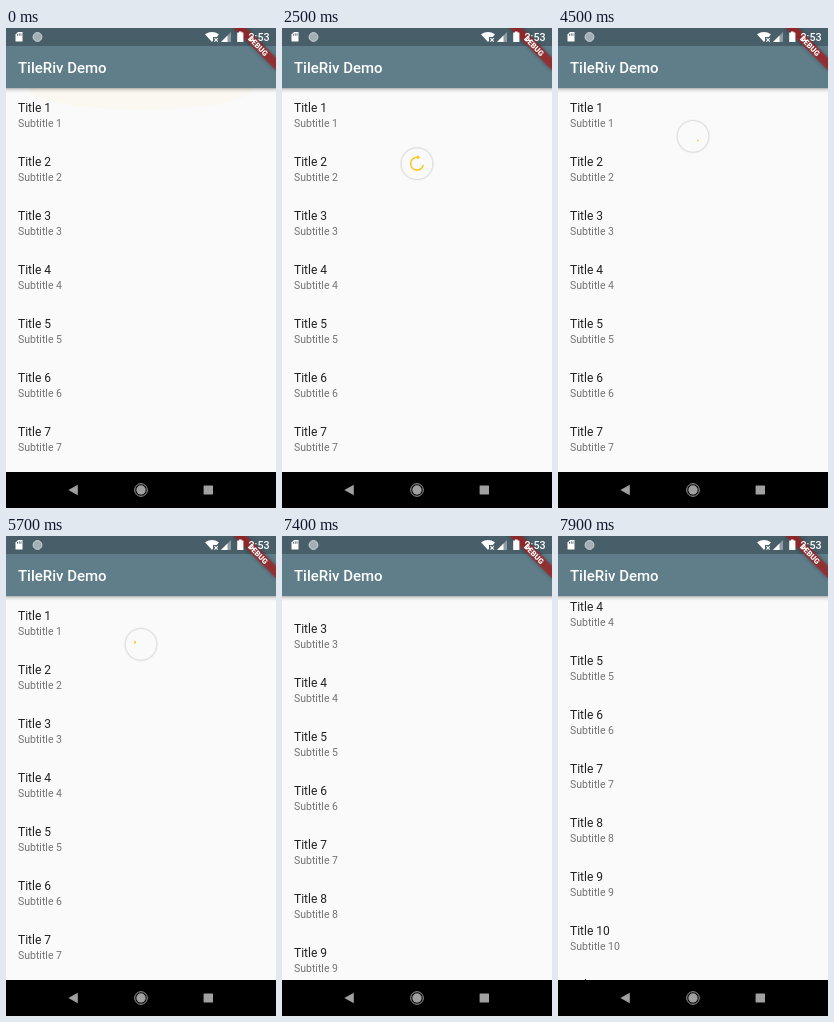
Animation, 270 px wide and 480 px high, one loop 8000 ms. Source, as an HTML page:

```html
<!DOCTYPE html>
<html lang="en">
<head>
<meta charset="utf-8">
<title>Pull to refresh list</title>
<style>
  html, body { margin: 0; width: 100%; height: 100%; overflow: hidden; background: #fafafa; }
  svg { display: block; width: 100vw; height: 100vh; font-family: Roboto, sans-serif; }
  .title { font-size: 12px; fill: rgba(0, 0, 0, .87); }
  .sub { font-size: 10.5px; fill: rgba(0, 0, 0, .54); }
  #disc { filter: drop-shadow(0 .8px 1px rgba(0, 0, 0, .32)); }
  #ribbon { filter: drop-shadow(0 0 2px rgba(0, 0, 0, .5)); }
</style>
</head>
<body>
<svg viewBox="0 0 270 480">
  <defs>
    <clipPath id="body"><rect y="60" width="270" height="384"/></clipPath>
    <linearGradient id="shade" x2="0" y2="1">
      <stop stop-color="#000" stop-opacity=".3"/>
      <stop offset=".4" stop-color="#000" stop-opacity=".1"/>
      <stop offset="1" stop-color="#000" stop-opacity="0"/>
    </linearGradient>
  </defs>
  <rect width="270" height="480" fill="#fafafa"/>

  <g clip-path="url(#body)">
    <g id="list"></g>
    <ellipse id="glow" cx="135" cy="60" rx="112" ry="22" fill="#ffd740"/>
    <g id="spinner">
      <circle id="disc" r="15.4" fill="#fafafa"/>
      <g id="ink">
        <path id="arc" fill="none" stroke="#fbc51d" stroke-width="1.5" stroke-linecap="square"/>
        <path id="arrow" fill="#fbc51d"/>
      </g>
    </g>
  </g>

  <rect y="60" width="270" height="5" fill="url(#shade)"/>
  <rect y="18" width="270" height="42" fill="#5f7e8a"/>
  <text x="12" y="45.2" font-size="15" font-weight="500" fill="#fff">TileRiv Demo</text>
  <rect width="270" height="18" fill="#485e68"/>

  <g transform="translate(270 0) rotate(45)">
    <rect id="ribbon" x="-30" y="21" width="60" height="9" fill="#b71c1c" fill-opacity=".66"/>
    <text y="28.2" font-size="7.65" font-weight="900" text-anchor="middle" fill="#fff">DEBUG</text>
  </g>

  <g fill="#fff">
    <path d="M12 4H16.5V13.5H9.5V6.5Z"/>
    <path d="M11.5 5.8V7.8M13.3 5.3V7.8M15 5.3V7.8" stroke="#485e68" stroke-width=".8"/>
    <circle cx="31.5" cy="9" r="4.4" fill="#a3afb4" stroke="#cdd5d8"/>
    <path d="M199 6.3Q206 1.5 213 6.3L210.8 9H207V12.8L206 14Z"/>
    <path d="M208.4 10.2L211.8 13.6M211.8 10.2L208.4 13.6" stroke="#fff" stroke-width="1.1"/>
    <path d="M215 14L225 4V14Z" fill="#8e9ca3"/>
    <path d="M215 14L221.5 7.5V14Z"/>
    <path d="M231.2 4.5H233V3.4H235.6V4.5H237.4V14H231.2Z"/>
    <text x="242.5" y="13" font-size="10.7" font-weight="500">2:53</text>
  </g>

  <rect y="444" width="270" height="36" fill="#000"/>
  <g fill="#a0a0a0">
    <path d="M62.3 462L71.8 456.8V467.2Z"/>
    <circle cx="135" cy="462" r="4.7"/>
    <circle cx="135" cy="462" r="6.3" fill="none" stroke="#a0a0a0"/>
    <rect x="197.6" y="457.4" width="9.4" height="9.2" rx=".6"/>
  </g>
</svg>

<script>
const LOOP = 8000;
const RADIUS = 6.4, STROKE = 1.5;
const PULL = 1700, HELD = 2650, RELEASE = 3005, SPIN = 3155, SHRINK = 6170, GONE = 6380;
const TRAVEL = 66.75, TURN = 1361;

const el = id => document.getElementById(id);
const clamp = (v, a = 0, b = 1) => Math.min(b, Math.max(a, v));
const span = (t, a, b) => clamp((t - a) / (b - a));
const smooth = u => u * u * (3 - 2 * u);
const show = (node, on) => node.setAttribute('display', on ? 'inline' : 'none');

// cubic-bezier(.4, 0, .2, 1)
function ease(x) {
  if (x <= 0 || x >= 1) return clamp(x);
  let lo = 0, hi = 1;
  for (let i = 0; i < 24; i++) {
    const s = (lo + hi) / 2, r = 1 - s;
    if (1.2 * r * r * s + .6 * r * s * s + s ** 3 < x) lo = s; else hi = s;
  }
  return lo * lo * (3 - 2 * lo);
}

function drawArc(start, sweep, head) {
  const point = (deg, r) => {
    const a = deg * Math.PI / 180;
    return [Math.cos(a) * r, Math.sin(a) * r];
  };
  const end = start + Math.max(sweep, .5);
  el('arc').setAttribute('d',
    `M${point(start, RADIUS)}A${RADIUS} ${RADIUS} 0 ${+(sweep > 180)} 1 ${point(end, RADIUS)}`);
  show(el('arrow'), head > 0);
  if (head > 0) {
    const half = STROKE * 1.5 * head, tip = STROKE * 2 * head;
    const [x, y] = point(end, RADIUS), [ux, uy] = point(end, 1);
    el('arrow').setAttribute('d',
      `M${point(end, RADIUS - half)}L${point(end, RADIUS + half)}L${x - uy * tip} ${y + ux * tip}Z`);
  }
}

function drawSpinner(t) {
  const on = t >= PULL && t < GONE;
  show(el('spinner'), on);
  if (!on) return;

  const pulled = .135 + 1.365 * smooth(span(t, PULL, HELD));
  const pos = pulled - .5 * ease(span(t, RELEASE, SPIN));
  const scale = 1 - span(t, SHRINK, GONE);
  el('spinner').setAttribute('transform',
    `translate(135 ${60 + pos * TRAVEL - 18.4}) scale(${scale})`);

  if (t < SPIN) {
    const value = pos / 2, phase = value / 2;
    el('ink').setAttribute('opacity', clamp(pos));
    drawArc(-90 + 306 * phase, 270 * ease(phase * 2), clamp(value * 2));
  } else {
    const phase = (t - SPIN) / TURN, turns = Math.floor(phase), f = phase - turns;
    const tail = ease(f * 2 - 1);
    el('ink').setAttribute('opacity', 1);
    drawArc(-157 + 290 * phase + 270 * (turns + tail), 270 * (ease(f * 2) - tail), 0);
  }
}

function draw(t) {
  const scroll = 171 * (1 - (1 - span(t, 7120, 7900)) ** 1.83);
  el('list').setAttribute('transform', `translate(0 ${-scroll})`);
  el('glow').setAttribute('opacity', .05 * (1 - span(t, 250, 600)));
  drawSpinner(t);
}

el('list').innerHTML = Array.from({ length: 11 }, (_, i) => {
  const y = 60 + 54 * i;
  return `<text class="title" x="12" y="${y + 24}">Title ${i + 1}</text>` +
    `<text class="sub" x="12" y="${y + 39}">Subtitle ${i + 1}</text>`;
}).join('');

const began = performance.now();
function tick() {
  draw((performance.now() - began) % LOOP);
  requestAnimationFrame(tick);
}
tick();
</script>
</body>
</html>
```
